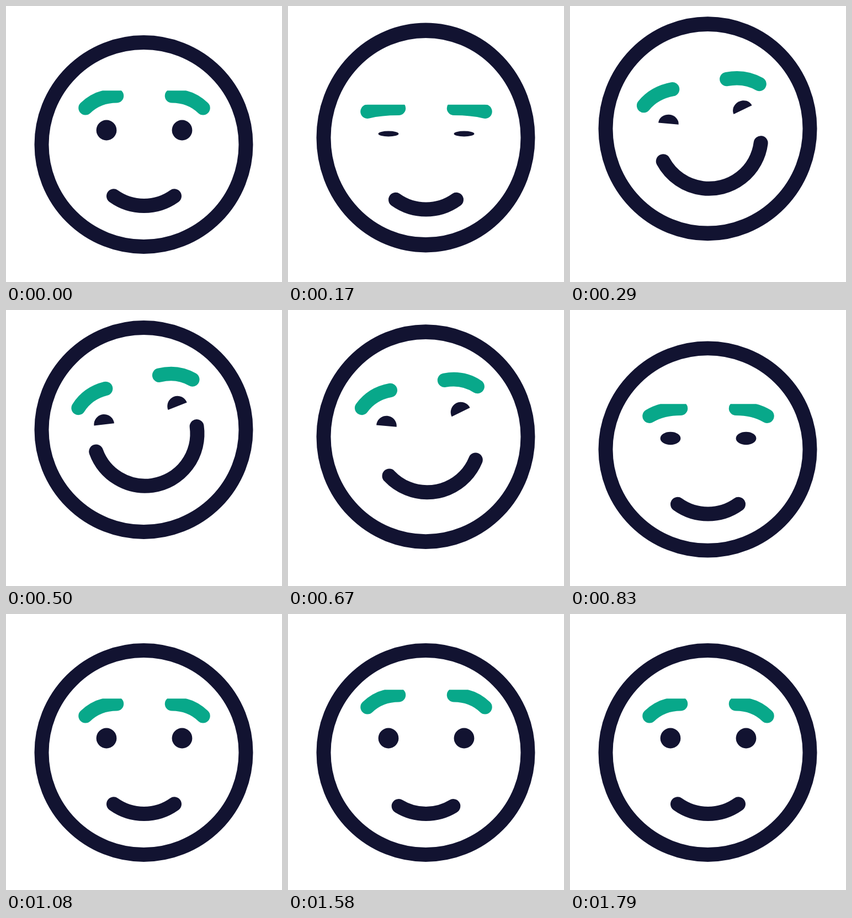
An HTML page with a canvas that plays this animation: 500 px wide and 500 px high, repeating every 2620 ms.

```html
<!DOCTYPE html>
<html lang="en">
<head>
<meta charset="utf-8">
<title>Laughing face</title>
<style>
  html, body { margin: 0; height: 100%; overflow: hidden; background: #fff; }
  canvas { display: block; width: 500px; height: 500px; }
</style>
</head>
<body>
<canvas id="stage" width="500" height="500"></canvas>
<script>
const ctx = document.getElementById('stage').getContext('2d');
const NAVY = '#121331', GREEN = '#08a88a';
const LOOP = 2620, FPS = 24, RAD = Math.PI / 180;

const smooth = k => (1 - Math.cos(Math.PI * k)) / 2;
const out = k => 1 - (1 - k) ** 3;
const snap = k => k < .5 ? 4 * k ** 3 : 1 - 4 * (1 - k) ** 3;

// Builds a function of the step from keys [step, value, easing into the key].
function track(...keys) {
  return step => {
    const i = keys.findIndex(key => key[0] > step);
    if (i < 0) return keys.at(-1)[1];
    if (i === 0) return keys[0][1];
    const [start, from] = keys[i - 1], [end, to, ease = smooth] = keys[i];
    return from + (to - from) * ease((step - start) / (end - start));
  };
}

const headY = track([0, 251], [2, 259], [12, 217, out], [23, 260], [26, 251]);
const stretch = track([0, 1], [2, .985], [4, 1.05], [10, 1], [12, 1], [16, 1.027], [20, .99], [26, 1]);
const faceY = track([0, 251], [4, 257.5], [12, 216, out], [14, 217], [20, 258.5, snap], [26, 251]);
const tiltAt = track([4, 0], [12, 14, out], [14, 14], [20, 0]);
const laughAt = track([4, 0], [12, 1, out], [19.5, 0]);
const openAt = track([0, 1], [4, .27], [8, 1], [16, 1], [18, .27], [22, 1]);
const flashAt = track([37, 0], [40, 1], [41, 1], [43, 0]);

function drawHead(y, scaleY) {
  ctx.save();
  ctx.translate(249.5, y);
  ctx.scale(1, scaleY);
  ctx.beginPath();
  ctx.arc(0, 0, 185, 0, 2 * Math.PI);
  ctx.stroke();
  ctx.restore();
}

// A tilted face has laughing eyes: the upper half of each, cut at an angle.
function drawEye(side, tilt, open) {
  const cut = tilt ? (7.5 + (14 - tilt) * 2.3) * RAD : 0;
  ctx.beginPath();
  ctx.ellipse(side * 68.5, -26, 18.4, 18.4 * open, -side * cut,
    tilt ? Math.PI : 0, 2 * Math.PI);
  ctx.fill();
}

function drawBrow(side, tilt, open, lift) {
  const outerY = -66.3, innerY = outerY - 22 * open;
  const top = outerY - 5.5 - 26 * open - (tilt ? 30 : 0);
  ctx.save();
  ctx.scale(-side, 1);
  ctx.translate(0, -lift);
  ctx.beginPath();
  ctx.rect(-150, top, 150, 150);
  ctx.clip();
  ctx.beginPath();
  ctx.moveTo(-106.5, outerY);
  ctx.quadraticCurveTo(-83.5, innerY, -50, innerY);
  ctx.stroke();
  ctx.restore();
}

function drawMouth(laugh, flash) {
  const half = (35.6 + 48.4 * laugh - 16.4 * flash) * RAD;
  ctx.beginPath();
  ctx.arc(-.5, 16.5 - 8.2 * laugh, 94.5, Math.PI / 2 - half, Math.PI / 2 + half);
  ctx.stroke();
}

function draw(step) {
  const tilt = tiltAt(step), open = openAt(step), flash = flashAt(step);

  ctx.fillStyle = '#fff';
  ctx.fillRect(0, 0, 500, 500);
  ctx.fillStyle = ctx.strokeStyle = NAVY;
  ctx.lineWidth = 26;
  ctx.lineCap = 'round';
  drawHead(headY(step), stretch(step));

  ctx.save();
  ctx.translate(250.5, faceY(step));
  ctx.rotate(-tilt * RAD);
  drawMouth(laughAt(step), flash);
  ctx.strokeStyle = GREEN;
  ctx.lineWidth = 25.5;
  for (const side of [-1, 1]) {
    drawEye(side, tilt, open);
    drawBrow(side, tilt, open, 64 * flash);
  }
  ctx.restore();
}

function tick() {
  const time = performance.now() % LOOP;
  draw(Math.floor((time + 5) * FPS / 1000));
  requestAnimationFrame(tick);
}
tick();
</script>
</body>
</html>
```
